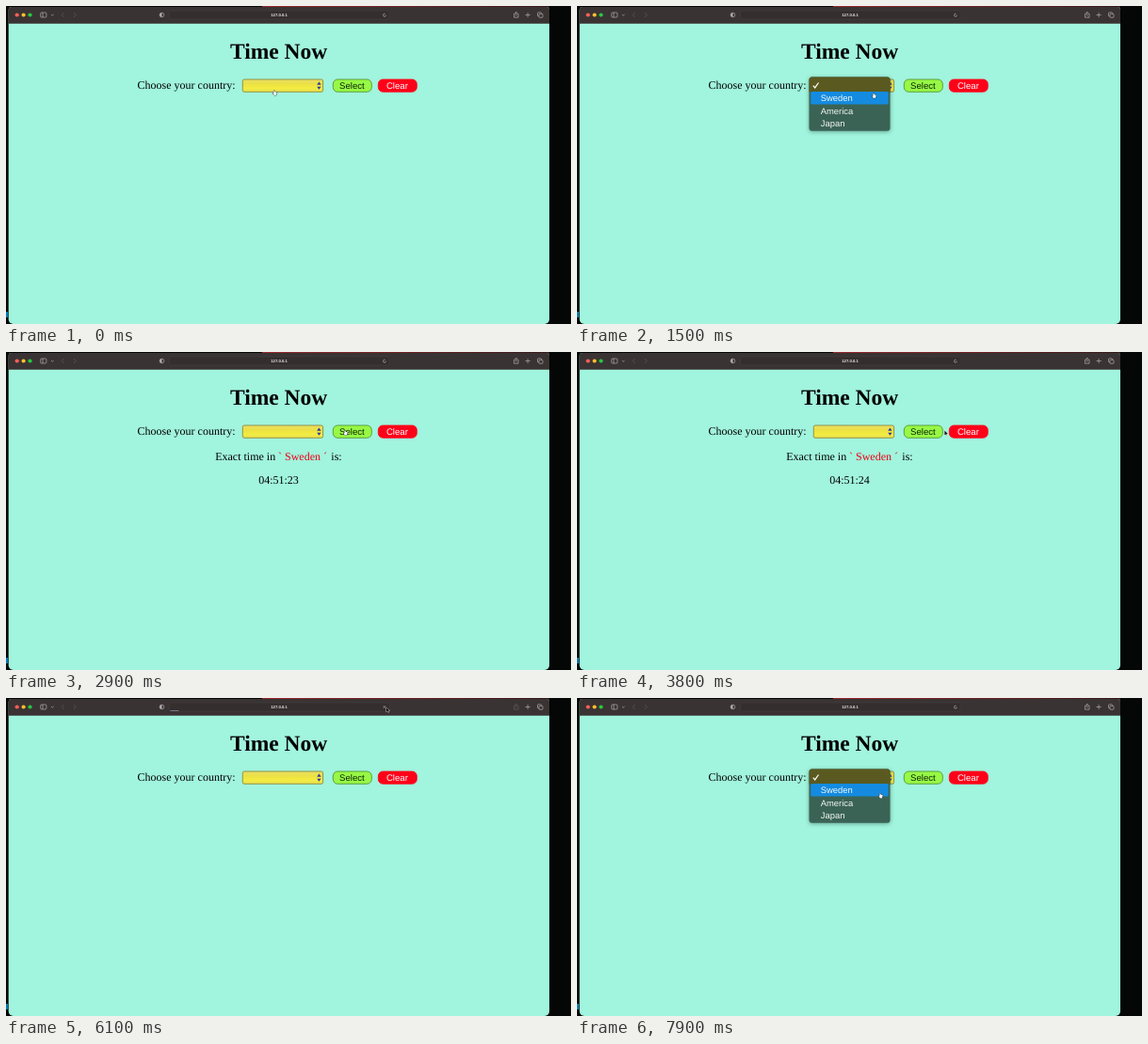
An HTML page with a canvas for the animation above (8 s loop, 600 by 338 pixels).

```html
<!DOCTYPE html>
<html lang="en">
<head>
<meta charset="utf-8">
<title>Time Now</title>
<style>
  html, body { margin: 0; width: 100%; height: 100%; overflow: hidden; background: #000; }
  canvas { display: block; width: 600px; height: 338px; }
</style>
</head>
<body>
<canvas id="stage" width="600" height="338"></canvas>
<script>
const stage = document.getElementById('stage').getContext('2d');
const layer = new OffscreenCanvas(600, 338).getContext('2d');
let ctx = stage;

const LOOP = 8000, STEP = 100;
const SERIF = '"Liberation Serif", "Times New Roman", serif';
const SANS = '"Liberation Sans", Arial, sans-serif';
const PAGE = '#a1f4dd', BAR = '#3a3333', ICON = '#b3adad', DIM = '#625a5a';
const ROWS = ['', 'Sweden', 'America', 'Japan'], ROW_TOP = 77.7, ROW_H = 13.4;

const MENU = { x: 251.3, y: 78, w: 85.3 };
const SELECT = { x: 347.3, y: 78, w: 41 };
const CLEAR = { x: 395.3, y: 78, w: 41 };
const CONTROL_H = 13.3;

// Pointer moves: start time, duration, destination
const START = [285, 90], ARROWS = [333, 85];
const MOVES = [
  [100, 900, ARROWS],
  [1150, 350, [315, 93]],
  [1800, 750, [360, 83.5]],
  [2900, 400, [385, 83.5]],
  [3600, 800, [419.5, 83.5]],
  [4700, 700, [403, 9]],
  [5400, 200, [404, 10]],
  [6100, 400, [391, 82]],
  [6600, 600, ARROWS],
  [7500, 400, [322, 101.5]]
];

const clamp = u => Math.max(0, Math.min(1, u));
const ease = u => u * u * (3 - 2 * u);
const between = (t, a, b) => t >= a && t < b;
const over = (c, [x, y]) => between(x, c.x, c.x + c.w) && between(y, c.y, c.y + CONTROL_H);

function pointerAt(t) {
  return MOVES.reduce((from, [start, length, to]) => {
    const e = ease(clamp((t - start) / length));
    return from.map((v, i) => v + (to[i] - v) * e);
  }, START);
}

function text(str, x, y, font, color, align = 'left') {
  ctx.font = font;
  ctx.textRendering = 'geometricPrecision';
  ctx.fillStyle = color;
  ctx.textAlign = align;
  ctx.fillText(str, x, y);
}

function paint(fill, stroke, width) {
  if (fill) { ctx.fillStyle = fill; ctx.fill(); }
  if (stroke) { ctx.strokeStyle = stroke; ctx.lineWidth = width; ctx.stroke(); }
}

function box(x, y, w, h, r, fill, stroke, width = 0.8) {
  ctx.beginPath();
  ctx.roundRect(x, y, w, h, r);
  paint(fill, stroke, width);
}

function arc(x, y, r, from, to, fill, stroke) {
  ctx.beginPath();
  ctx.arc(x, y, r, from, to);
  paint(fill, stroke, 0.7);
}

function path(d, fill, stroke, width = 0.7) {
  const p = new Path2D(d);
  if (stroke) { ctx.strokeStyle = stroke; ctx.lineWidth = width; ctx.stroke(p); }
  if (fill) { ctx.fillStyle = fill; ctx.fill(p); }
}

function gradient(x0, y0, x1, y1, ...colors) {
  const g = ctx.createLinearGradient(x0, y0, x1, y1);
  colors.forEach((c, i) => g.addColorStop(i / (colors.length - 1), c));
  return g;
}

function drawWindow() {
  ctx.fillStyle = '#050606';
  ctx.fillRect(0, 0, 600, 338);
  ctx.fillStyle = '#0878b4';
  ctx.fillRect(0, 325, 2, 6);
  box(2.7, 1, 574.3, 337, [3, 3, 5, 5], PAGE);
  box(2.7, 1, 574.3, 17.7, [3, 3, 0, 0], BAR);
  ctx.fillStyle = gradient(272, 0, 577, 0, '#962629', '#6d2022', '#34191a');
  ctx.fillRect(272, 0, 305, 1);
}

function drawToolbar(t) {
  const loading = between(t, 6100, 6500), stopIcon = between(t, 6100, 6700);
  ['#ff5f57', '#febc2e', '#28c840'].forEach((c, i) => arc(11.7 + i * 6.9, 9.5, 2.1, 0, 7, c));
  box(36.7, 7, 6.2, 5, 1, null, ICON, 0.7);
  path('M39 7v5M48 9l1.3 1.2 1.3-1.2', null, ICON);
  path('M61.5 7l-2.2 2.5 2.2 2.5M72 7l2.2 2.5-2.2 2.5', null, DIM);
  arc(165.5, 9.5, 2.3, 0, 7, null, ICON);
  arc(165.5, 9.5, 2.3, Math.PI / 2, Math.PI * 1.5, ICON);

  box(173.5, 5, 233.5, 9, 2, '#352e2e', '#463f3f', 0.6);
  text('127.0.0.1', 290, 11, 'bold 4.2px ' + SANS, '#f2eeee', 'center');
  if (loading) {
    ctx.fillStyle = '#8b98a8';
    ctx.fillRect(174.5, 13.2, 9 + 222 * (t - 6100) / 300, 0.7);
  }
  if (stopIcon) path('M400.6 8.2l2.6 2.6m0-2.6l-2.6 2.6', null, ICON);
  else arc(402, 9.7, 1.5, 0, 5.2, null, ICON);

  path('M540.7 8.2h-1.2v4H544v-4h-1.2M541.75 10.5V6.4M540.5 7.5l1.25-1.3 1.25 1.3', null, loading ? DIM : ICON);
  path('M551.5 9.5h5.2M554.1 7v5.1', null, ICON);
  [0, 1.5].forEach(d => box(564.5 + d, 6.8 + d, 4, 4, 0.8, BAR, ICON, 0.7));
}

function button(area, label, fill, border, color) {
  box(area.x, area.y, area.w, CONTROL_H, 5, fill, border);
  text(label, area.x + area.w / 2 - 0.4, 88.2, '9.6px ' + SANS, color, 'center');
}

function drawForm(clearHover) {
  text('Time Now', 289.6, 56, 'bold 23.5px ' + SERIF, '#000', 'center');
  text('Choose your country:', 139.6, 88.3, '12px ' + SERIF, '#000');
  const gold = gradient(0, 78, 0, 92, '#e8df68', '#ece044', '#f3ec40', '#e6dd55');
  box(MENU.x, MENU.y, MENU.w, CONTROL_H, 1.8, gold, '#857d30');
  path('M330.2 83.7l2.2-3.1 2.2 3.1zM330.2 85.7l2.2 3.1 2.2-3.1z', '#2b38a4');
  button(SELECT, 'Select', '#97f845', '#4d8a2c', '#0c2406');
  if (clearHover) button(CLEAR, 'Clear', '#e6f6f1', '#7f9993', '#f0001c');
  else button(CLEAR, 'Clear', '#ff0019', '#ff0019', '#fff');
}

function drawResult(clock) {
  const part = (str, x, color = '#000') => text(str, x, 114.5, '12px ' + SERIF, color);
  part('Exact time in', 222.2);
  part('` Sweden ´', 289, '#f20014');
  part('is:', 345.3);
  text(clock, 289.5, 140, '12px ' + SERIF, '#000', 'center');
}

function drawMenu(active, alpha) {
  ctx = layer;
  ctx.clearRect(0, 0, 600, 338);
  ctx.shadowColor = 'rgba(0,40,30,.4)';
  ctx.shadowBlur = 4;
  ctx.shadowOffsetY = 1;
  box(246.5, 75.5, 86, 57.2, 3, '#3b6355');
  ctx.shadowColor = 'transparent';
  box(246.5, 75.5, 86, 15.7, [3, 3, 0, 0], '#5a5a20');
  box(248.2, ROW_TOP + active * ROW_H, 82.4, ROW_H, 1.5, '#148be0');
  path('M250.8 84.6l1.9 2.3 3.8-5.4', null, '#fff', 1.2);
  ROWS.forEach((name, i) => text(name, 258.8, 87.8 + i * ROW_H, '9.4px ' + SANS, '#f2f7f5'));
  ctx = stage;
  ctx.globalAlpha = alpha;
  ctx.drawImage(layer.canvas, 0, 0);
  ctx.globalAlpha = 1;
}

function drawPointer([x, y], hand) {
  ctx.save();
  ctx.translate(x, y);
  if (hand) path('M-.6 0H.5L.6 1.2 2.8 1.8 1.9 4.9H0L-1.7 2.8-.6 2.7z', '#fff', '#222', 0.9);
  else path('M0 0V4.8L1.1 3.9 2.2 5.4 2 3.5 3.4 3.4z', '#111', '#eee');
  ctx.restore();
}

function render(t) {
  const pointer = pointerAt(t);
  const menuOpen = between(t, 1100, 2000) || t >= 7300;
  const menuAlpha = t >= 7300 ? 1 : t < 1100 ? 0 : clamp(1 - (t - 1900) / 360);
  const row = t > 1900 && t < 7300 ? 1 : Math.floor(clamp((pointer[1] - ROW_TOP) / 54) * 3.99);
  const hand = menuOpen || [MENU, SELECT, CLEAR].some(c => over(c, pointer));

  drawWindow();
  drawToolbar(t);
  drawForm(over(CLEAR, pointer));
  if (between(t, 2800, 4700)) drawResult(t < 3700 ? '04:51:23' : '04:51:24');
  if (menuAlpha > 0) drawMenu(row, menuAlpha);
  drawPointer(pointer, hand);
}

function tick() {
  render(Math.floor(performance.now() % LOOP / STEP) * STEP);
  requestAnimationFrame(tick);
}
tick();
</script>
</body>
</html>
```
